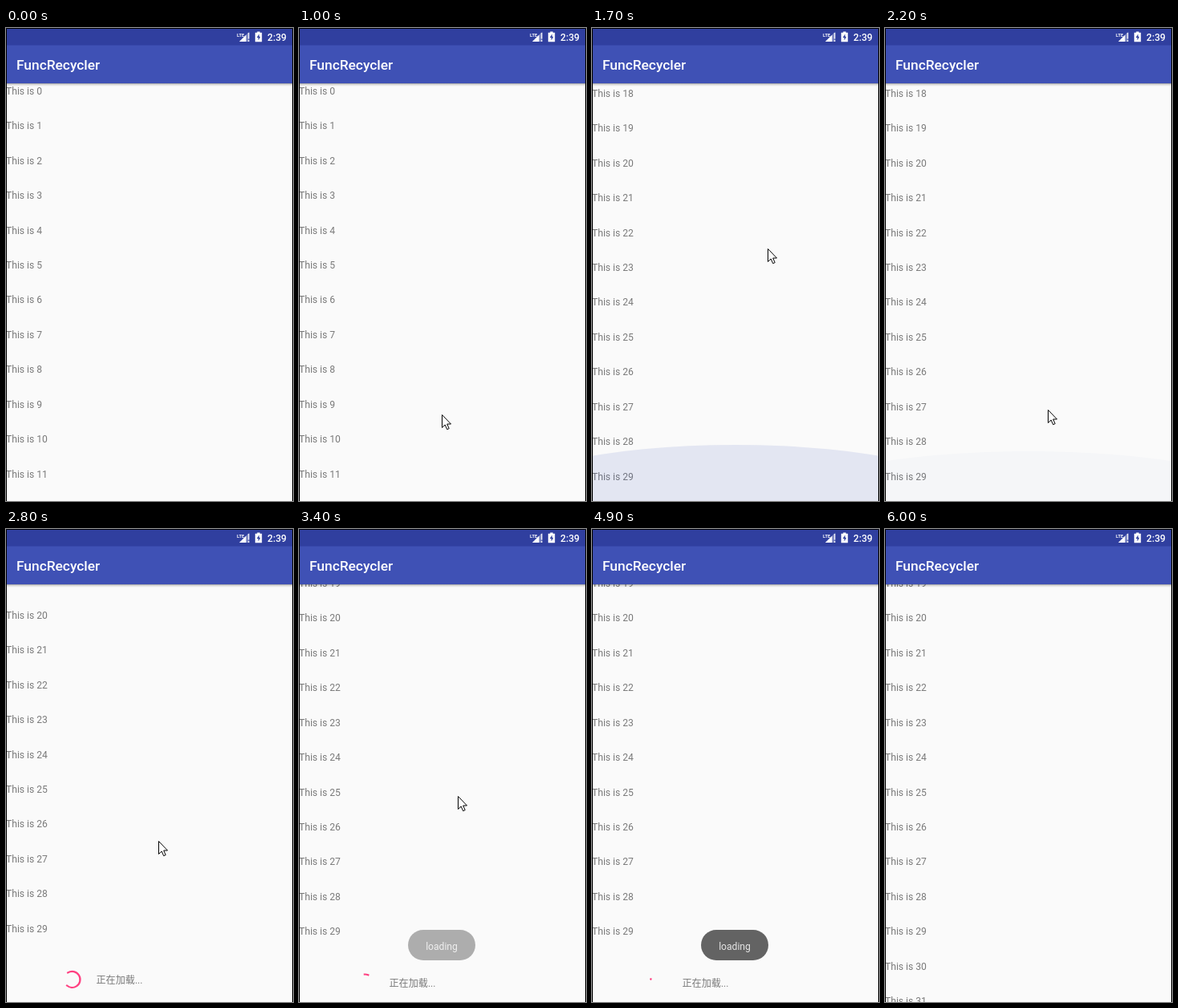
Write an HTML page that moves like this. It is 358x590 px and loops after 6800 ms.

```html
<!DOCTYPE html>
<html lang="en">
<head>
<meta charset="utf-8">
<title>FuncRecycler</title>
<style>
  html, body { margin: 0; width: 100%; height: 100%; overflow: hidden; background: #fafafa; }
  svg { display: block; }
  text { font-family: Roboto, "Noto Sans CJK SC", "Noto Sans CJK", sans-serif; font-size: 12.1px; }
  #list text { fill: #7a7a7a; }
  .medium { font-weight: 500; fill: #fff; }
</style>
</head>
<body>
<svg width="358" height="590" viewBox="0 0 358 590">
  <defs>
    <linearGradient id="shade" x2="0" y2="1">
      <stop offset="0" stop-opacity=".38"/>
      <stop offset=".4" stop-opacity=".12"/>
      <stop offset="1" stop-opacity="0"/>
    </linearGradient>
  </defs>
  <rect width="358" height="590" fill="#fafafa"/>

  <g id="list">
    <g id="rows"></g>
    <g id="more"></g>
    <g id="footer">
      <circle id="spinner" cx="82.5" cy="1401.5" r="10" fill="none" stroke="#ff4081"
              stroke-width="2.2" stroke-linecap="square" pathLength="360"/>
      <text x="112.5" y="1406.5" lang="zh">正在加载...</text>
    </g>
  </g>

  <ellipse id="glow" cx="179" cy="590" rx="300" fill="#3f51b5"/>

  <g id="toast">
    <rect x="136" y="500" width="84" height="38" rx="19" fill="#636363"/>
    <text x="178" y="524.5" text-anchor="middle" fill="#e6e6e6">loading</text>
  </g>

  <rect y="69" width="358" height="4" fill="url(#shade)"/>
  <rect width="358" height="22" fill="#303f9f"/>
  <rect y="21.5" width="358" height="47.5" fill="#3f51b5"/>
  <text class="medium" x="13" y="52" style="font-size:17.35px">FuncRecycler</text>

  <g fill="#fff">
    <text x="288" y="10.5" fill="#fff" style="font-size:5.6px;font-weight:700">LTE</text>
    <path d="M291 17L303.5 4.5V17Z" opacity=".3"/>
    <path d="M291 17L299.5 8.500V17Z"/>
    <path d="M301.800 6h1.600v7.500h-1.600zM301.800 15h1.600v2h-1.600z" opacity=".85"/>
    <path d="M313.300 4.500h3.400v1.300h2.500v11.400h-8.400v-11.400h2.500z"/>
    <path d="M315.700 7.500l-2.900 4.600h1.900v3.400l2.700-4.700h-1.700z" fill="#303f9f"/>
  </g>
  <text class="medium" x="350" y="15.500" text-anchor="end" style="font-size:12.2px">2:39</text>

  <path id="cursor" d="M.5.5V16.500L4.200 13 6.700 18.700 9.200 17.600 6.700 12H11.500Z"
        fill="#fff" stroke="#000" stroke-linejoin="round"/>
  <path d="M.5 590V.5H357.500V590" fill="none" stroke="#000"/>
</svg>

<script>
  const LOOP = 6800, STEP = 100, ROW = 43.43;
  const $ = id => document.getElementById(id);

  function addRows(group, from, to) {
    for (let i = from; i < to; i++) {
      const row = document.createElementNS('http://www.w3.org/2000/svg', 'text');
      row.setAttribute('y', 82.8 + i * ROW);
      row.textContent = 'This is ' + i;
      group.append(row);
    }
  }
  addRows($('rows'), 0, 30);
  addRows($('more'), 30, 33);

  // Keys are [time, value...], linear in between.
  const scroll = [[1100, 0], [1200, 50], [1300, 250], [1400, 480], [1500, 670], [1600, 755],
    [1700, 778.7], [2500, 778.7], [2800, 839.6], [3200, 839.6], [3300, 836]];
  const pointer = [[400, 312, 242], [700, 232, 380], [1000, 178, 482], [1100, 178, 482],
    [1300, 204, 345], [1500, 219, 275], [1800, 219, 275], [2000, 211, 400], [2200, 203, 476],
    [2400, 195, 478], [2500, 195, 476], [2800, 190, 389], [3200, 194, 345], [3800, 206, 310],
    [3900, 222, 290], [4200, 273, 228]];
  const glow = [[1500, 0, 0], [1700, .12, 70], [1900, .08, 70], [2200, .025, 62], [2400, 0, 40]];
  const toast = [[3200, 0], [3600, 1], [5200, 1], [5700, 0]];
  const footer = [[5600, 1], [5800, 0]];
  const more = [[5800, 0], [6000, 1]];

  function at(keys, t) {
    const n = keys.findIndex(k => k[0] > t);
    if (n === 0) return keys[0].slice(1);
    if (n < 0) return keys[keys.length - 1].slice(1);
    const a = keys[n - 1], b = keys[n], f = (t - a[0]) / (b[0] - a[0]);
    return a.slice(1).map((v, i) => v + (b[i + 1] - v) * f);
  }

  // Solves the trim easing: a cubic from (0,0) to (.5,1) through x1 and x2.
  function ease(x, x1, x2) {
    if (x <= 0) return 0;
    if (x >= .5) return 1;
    let lo = 0, hi = 1;
    for (let i = 0; i < 20; i++) {
      const u = (lo + hi) / 2, v = 1 - u;
      if (3 * v * v * u * x1 + 3 * v * u * u * x2 + u * u * u * .5 < x) lo = u; else hi = u;
    }
    return lo * lo * (3 - 2 * lo);
  }

  function spin(t) {
    const ms = (t - 4900) * 1.05;
    const p = ((ms / 1333) % 1 + 1) % 1;
    const head = 270 * ease(p, .2, .1), tail = 270 * ease(p - .5, .2, .1);
    const angle = 204 + ms * .162 + 90 * p + tail;
    $('spinner').setAttribute('stroke-dasharray', Math.max(head - tail, .1) + ' 400');
    $('spinner').setAttribute('transform', `rotate(${angle} 82.5 1401.5)`);
  }

  function draw(now) {
    const t = Math.floor(now % LOOP / STEP) * STEP;
    const [x, y] = at(pointer, t), [alpha, height] = at(glow, t);
    $('list').setAttribute('transform', `translate(0 ${-at(scroll, t)[0]})`);
    $('cursor').setAttribute('transform', `translate(${Math.round(x)} ${Math.round(y)})`);
    $('cursor').style.opacity = t >= 400 && t < 4300 ? 1 : 0;
    $('glow').setAttribute('ry', height);
    $('glow').style.opacity = alpha;
    $('toast').style.opacity = at(toast, t)[0];
    $('footer').style.opacity = at(footer, t)[0];
    $('more').style.opacity = at(more, t)[0];
    spin(t);
  }

  const start = performance.now();
  function tick() {
    draw(performance.now() - start);
    requestAnimationFrame(tick);
  }
  tick();
</script>
</body>
</html>
```
